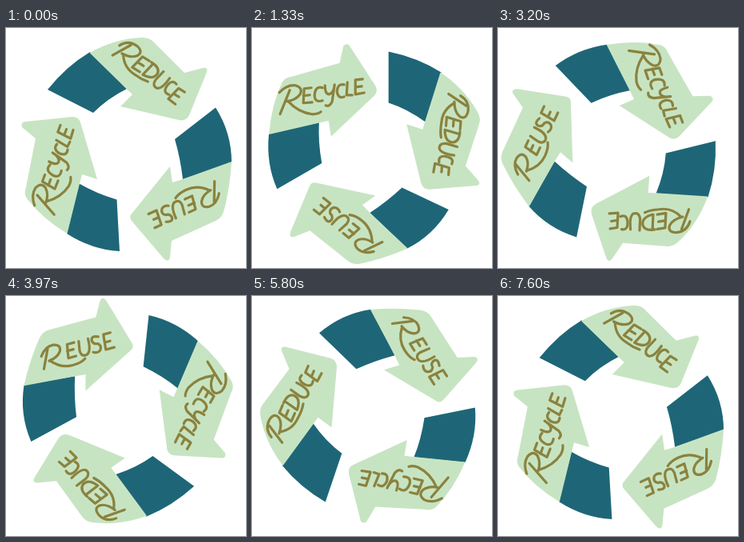
Animation, 300 px wide and 300 px high, one loop 7.63 s. Source, as an HTML page:

```html
<!DOCTYPE html>
<html lang="en">
<head>
<meta charset="utf-8">
<title>Reduce, reuse, recycle</title>
<style>
  html, body { margin: 0; width: 100%; height: 100%; overflow: hidden; background: #fff; }
  svg { display: block; width: 100%; height: 100%; }
  .tail { fill: #1e6677; }
  .head { fill: #c7e4c2; }
  .word { fill: none; stroke: #8a823e; stroke-width: 3.2; stroke-linecap: round; stroke-linejoin: round; }
</style>
</head>
<body>
<svg viewBox="0 0 300 300" role="img" aria-label="Reduce, reuse, recycle">
  <g id="wheel">
    <g>
      <path class="tail" d="M52 77Q75 48 105 30L151 76Q127 88 109 106Z"/>
      <path class="head" d="M104.500 31C124 20 146 13 168 12Q179 11 185 18L223 56L246 50Q253 49 251 55L229 109Q225 117 216 115L143 98L158 83L150.500 76Z"/>
      <!-- Reduce -->
      <g class="word" transform="rotate(31.500 150 150)">
        <path d="M88 37L75 60M76 45Q82 33 95 34Q106 36 102 44Q97 51 84 52M86 52Q95 66 112 66Q122 67 130 65"/>
        <path d="M118 42L108 42L104 60L115 60M106 51L115 51"/>
        <path d="M124 42L120 61Q135 60 135 50Q134 42 121 42"/>
        <path d="M140 44L137 58Q137 67 144 66Q150 64 151 47"/>
        <path d="M162 49Q154 46 153 58Q153 67 161 65"/>
        <path d="M176 52L167 52L163 70L174 71M165 61L173 61"/>
      </g>
    </g>
    <g>
      <path class="tail" d="M262 99.500Q282 131 282 168L221 189Q218 163 211 139Z"/>
      <path class="head" d="M282 167Q280 200 272 230Q269 238 262 241L207 266L205 287Q203 294 197 288L157 241Q153 236 158 231L205 173L208 193L221 189Z"/>
      <!-- Reuse -->
      <g class="word" transform="rotate(-231.400 150 150) translate(127.500 30) rotate(27)">
        <path d="M2 -10L-9 13M-8 -3Q0 -14 10 -13Q20 -11 16 -3Q11 4 0 5M1 5Q12 18 27 18Q38 18 44 14"/>
        <path d="M36 -9L27 -9L24 8L34 8M25 -1L33 -1"/>
        <path d="M42 -9L40 3Q40 11 47 10Q54 8 54 -9"/>
        <path d="M67 -8Q58 -12 58 -5Q59 0 64 0Q69 4 65 9Q61 12 56 9"/>
        <path d="M83 -9L74 -9L72 10L83 10M73 1L80 1"/>
      </g>
    </g>
    <g>
      <path class="tail" d="M142 279Q107 277 76 257L91.500 194.500Q113 207 138.500 214.500Z"/>
      <path class="head" d="M76.500 257Q45 238 26 213Q22 207 25 199L37 138L20 124Q18 117 25 117L83 111Q91 111 93 118L114 189L95 183L92 194.500Z"/>
      <!-- Recycle -->
      <g class="word" transform="rotate(-62.900 150 150) translate(-2 0)">
        <path d="M49 78L37 108M36 81Q45 71 56 72Q66 75 62 83Q56 91 45 92M47 92Q60 106 77 108Q84 108 88 105"/>
        <path d="M76 75L67 76L66 94L77 93M66 85L74 84"/>
        <path d="M90 75Q81 72 80 84Q80 94 90 91"/>
        <path d="M93 72Q93 83 98 83Q104 82 105 71L102 92Q99 99 94 97"/>
        <path d="M117 71Q109 69 108 79Q109 89 117 86"/>
        <path d="M121 68L120 84L127 84"/>
        <path d="M140 64L131 65L131 83L142 81M131 74L139 73"/>
      </g>
    </g>
  </g>
</svg>
<script>
  const LOOP = 7630;   // ms
  const TURN = 2553;   // ms for one eased third of a turn
  const wheel = document.getElementById('wheel');
  const start = performance.now();

  // 25 drawings per second shown on a 30 fps grid
  const drawnTime = t => Math.floor(Math.floor((t + 5) * 0.03) * 5 / 6) * 40;

  function angleAt(t) {
    const turns = drawnTime(t) / TURN;
    const whole = Math.floor(turns);
    const u = turns - whole;
    return 120 * (whole + u * u * (3 - 2 * u));
  }

  function draw() {
    const t = Math.max(0, performance.now() - start) % LOOP;
    wheel.setAttribute('transform', `rotate(${angleAt(t).toFixed(3)} 150 150)`);
    requestAnimationFrame(draw);
  }
  draw();
</script>
</body>
</html>
```
